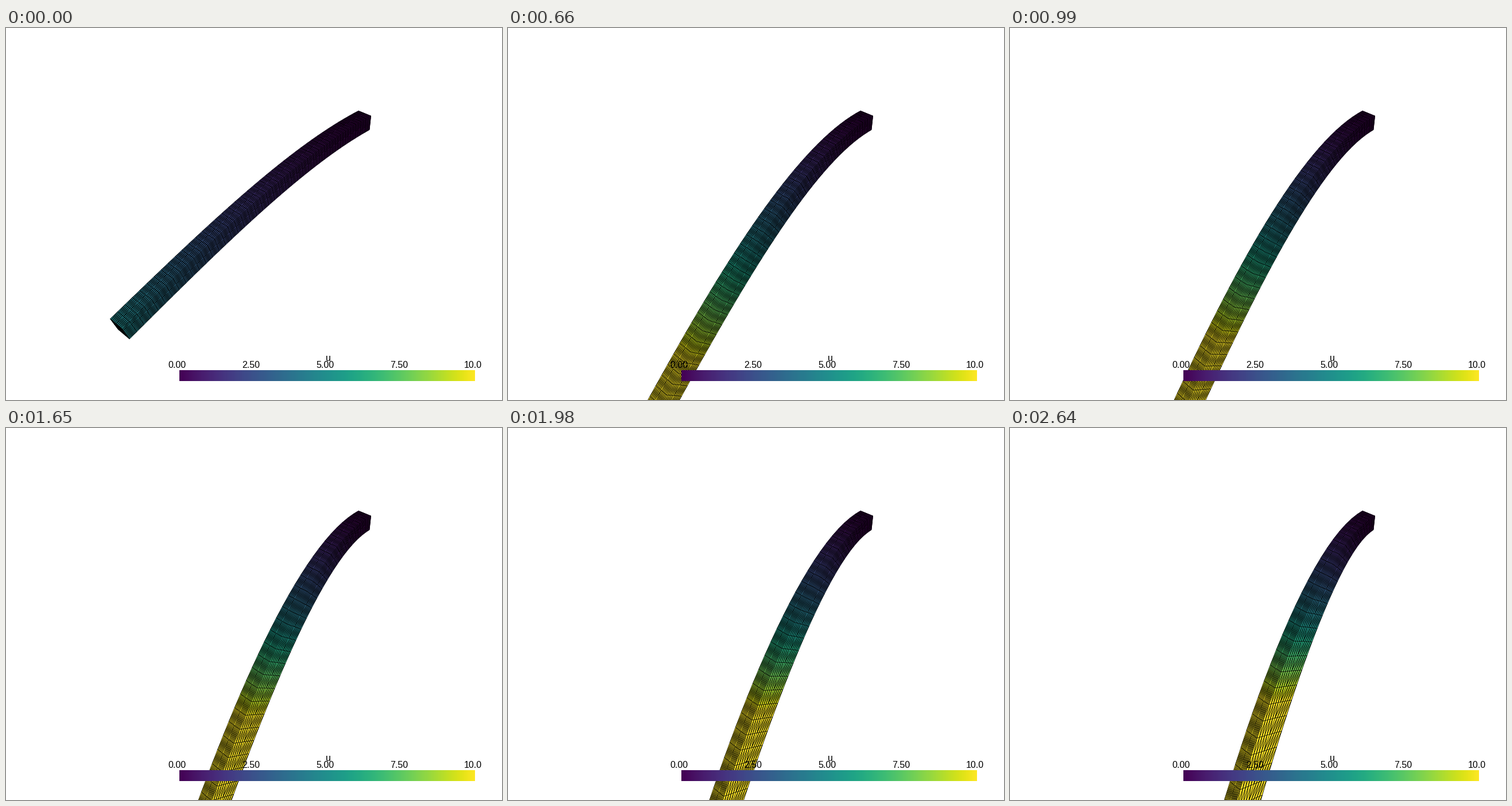
A matplotlib script for the animation above (2970 ms loop, 864x648 px).

```python
import numpy as np
import matplotlib.pyplot as plt
from matplotlib.animation import FuncAnimation
from matplotlib.collections import LineCollection, PolyCollection

W, H, DPI = 864, 648, 100
PX = 72 / DPI
STEPS, INTERVAL = 9, 330

# Cantilever with a square section, clamped at x = 0, loaded at the tip
LENGTH, YOUNG, POISSON, LOAD = 20.0, 1e4, 0.3, 1.5
STIFFNESS = YOUNG / 12
U_MAX = 10


def displacement(p, step):
    x, eta, zeta = p[..., 0], p[..., 1] - 0.5, p[..., 2] - 0.5
    k = -step * LOAD / (6 * STIFFNESS)
    w = k * x**2 * (3 * LENGTH - x)
    slope = k * (6 * LENGTH * x - 3 * x**2)
    curvature = k * 6 * (LENGTH - x)
    lateral = POISSON * curvature * (1 - np.exp(-3 * x))
    return np.stack([-zeta * slope,
                     lateral * zeta * eta,
                     w + lateral * (zeta**2 - eta**2) / 2], axis=-1)


# Isometric perspective camera framing the beam after the first load step
box = np.stack(np.meshgrid([0, LENGTH], [0, 1], [0, 1]), axis=-1).reshape(-1, 3)
box = box + displacement(box, 1)
low, high = box.min(axis=0), box.max(axis=0)
CENTER = (low + high) / 2
HALF_ANGLE = np.radians(15)
DISTANCE = np.linalg.norm(high - low) / 2 / np.sin(HALF_ANGLE)
FOCAL = H / 2 / np.tan(HALF_ANGLE)
RIGHT = np.array([-1, 1, 0]) / np.sqrt(2)
UP = np.array([-1, -1, 2]) / np.sqrt(6)
TOWARD = np.array([1, 1, 1]) / np.sqrt(3)


def project(p):
    d = p - CENTER
    scale = FOCAL / (DISTANCE - d @ TOWARD)
    return np.stack([W / 2 + scale * (d @ RIGHT),
                     H / 2 - scale * (d @ UP)], axis=-1)


def quads(face, nu, nv):
    a, b = np.meshgrid(np.linspace(0, 1, nu + 1), np.linspace(0, 1, nv + 1),
                       indexing="ij")
    g = np.stack(np.broadcast_arrays(*face(a, b)), axis=-1)
    cells = [g[:-1, :-1], g[1:, :-1], g[1:, 1:], g[:-1, 1:]]
    return np.stack(cells, axis=2).reshape(-1, 4, 3)


def top(a, b):
    return LENGTH * a, b, 1.0


def side(a, b):
    return LENGTH * b, 1.0, a


def end(a, b):
    return LENGTH, a, b


mesh = np.concatenate([quads(top, 40, 10), quads(side, 10, 40), quads(end, 10, 10)])
skin = np.concatenate([quads(top, 160, 10), quads(side, 10, 160), quads(end, 10, 10)])


def outline(cells):
    return np.stack([cells, np.roll(cells, -1, axis=1)], axis=2)


# Neighbouring cells share edges: keep each edge once
middles = outline(mesh).mean(axis=2).reshape(-1, 3).round(4)
_, unique = np.unique(middles, axis=0, return_index=True)


def facing(flat):
    d1, d2 = flat[:, 2] - flat[:, 0], flat[:, 3] - flat[:, 1]
    return d1[:, 0] * d2[:, 1] - d1[:, 1] * d2[:, 0] < 0


def wireframe(step):
    """Cell edges plus the shorter diagonal of every cell."""
    solid = mesh + displacement(mesh, step)
    flat = project(solid)
    seen = facing(flat)
    sides = outline(flat).reshape(-1, 2, 2)[unique]
    first = np.linalg.norm(solid[:, 2] - solid[:, 0], axis=-1)
    second = np.linalg.norm(solid[:, 3] - solid[:, 1], axis=-1)
    diagonals = np.where((first <= second)[:, None, None],
                         flat[:, [0, 2]], flat[:, [1, 3]])
    return np.concatenate([sides[seen[unique // 4]], diagonals[seen]])


def surface(step):
    u = displacement(skin, step)
    flat = project(skin + u)
    seen = facing(flat)
    return flat[seen], np.linalg.norm(u.mean(axis=1), axis=-1)[seen]


fig = plt.figure(figsize=(W / DPI, H / DPI), dpi=DPI, facecolor="white")
ax = fig.add_axes([0, 0, 1, 1])

fill = PolyCollection([], cmap="viridis", edgecolors="face",
                      linewidths=0.5 * PX, zorder=1)
fill.set_clim(0, U_MAX)
edges = LineCollection([], colors="black", linewidths=0.8 * PX,
                       capstyle="butt", zorder=2)
ax.add_collection(fill, autolim=False)
ax.add_collection(edges, autolim=False)

# Scalar bar
ax.imshow(np.linspace(0, 1, 256)[None, :], cmap="viridis", aspect="auto",
          extent=(302, 817, 615, 596), interpolation="nearest", zorder=3)


def label(x, y, text):
    ax.text(x, y, text, ha="center", va="baseline", color="black",
            family="Liberation Sans", fontsize=16 * PX, zorder=4)


for i, text in enumerate(["0.00", "2.50", "5.00", "7.50", "10.0"]):
    label(298.2 + 128.8 * i, 591.5, text)
label(561.5, 579.5, "u")

ax.set_xlim(0, W)
ax.set_ylim(H, 0)
ax.axis("off")


def update(frame):
    step = frame + 1
    polys, values = surface(step)
    fill.set_verts(polys)
    fill.set_array(values)
    edges.set_segments(wireframe(step))
    return fill, edges


anim = FuncAnimation(fig, update, frames=STEPS, interval=INTERVAL,
                     repeat=True, repeat_delay=0, blit=False)
plt.show()
```
